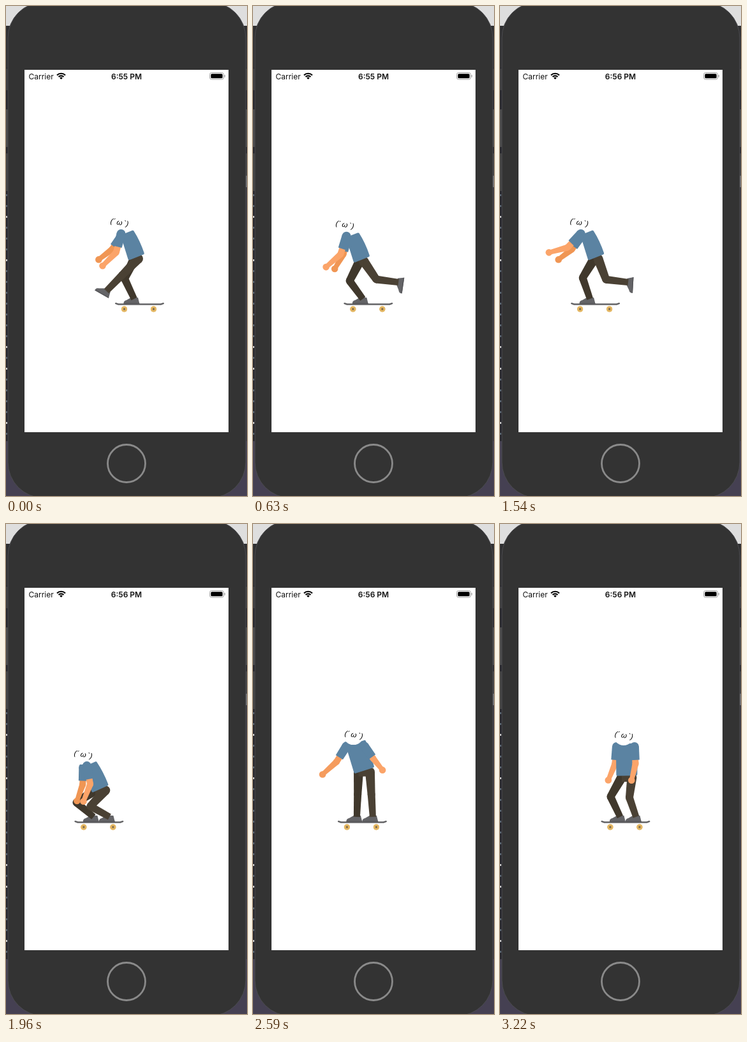
Recreate the animation shown at these times as an HTML page with a canvas. Size 378 by 768 pixels, loop 3.29 s.

```html
<!DOCTYPE html>
<html lang="en">
<head>
<meta charset="utf-8">
<title>Skater</title>
<style>
html, body { margin: 0; width: 100%; height: 100%; overflow: hidden; background: #24242a; }
canvas { display: block; }
</style>
</head>
<body>
<canvas id="stage" width="378" height="768"></canvas>
<script>
const ctx = document.getElementById('stage').getContext('2d');
const LOOP = 3290, STEP = 70, STRIDE = 930, TAU = Math.PI * 2, RAD = Math.PI / 180;
const SHIRT = '#5b83a2', PANTS = '#4a4134', PANTS_FAR = '#40382c', SHOE = '#646467';

const mix = (a, b, k) => a + (b - a) * k;
const add = (a, b) => [a[0] + b[0], a[1] + b[1]];
const blend = (a, b, k) => Object.fromEntries(Object.keys(a).map(key => [key, mix(a[key], b[key], k)]));

// Eased 0..1 while t goes from a to b
function ramp(t, a, b) {
  const u = Math.min(1, Math.max(0, (t - a) / (b - a)));
  return (1 - Math.cos(Math.PI * u)) / 2;
}

// x: hip from board, y: hip, gap: half distance of the legs, cx/cy: chest from hip,
// near/far: arm angles forward from straight down, with the arm lengths
const CROUCH = { x: 7, y: 425, gap: 10, cx: -17, cy: -39, near: 0, nearLen: 55, far: 3, farLen: 54, bend: 8 };
const AIR = { x: -2.5, y: 337, gap: 7.5, cx: -7, cy: -50, near: -90, nearLen: 36, far: 93, farLen: 64, bend: -13 };
const STAND = { x: 2, y: 397, gap: 8, cx: -1, cy: -51, near: 5, nearLen: 53, far: 14, farLen: 54, bend: 4 };

function pushPose(t) {
  const sway = Math.cos(TAU * t / 1540), step = Math.cos(TAU * t / STRIDE);
  return {
    x: -7 + 6 * sway - 4 * step, y: 398 - 2 * sway, gap: 3, cx: -14, cy: -39,
    near: 36 - 19 * step + 13 * sway, nearLen: 58,
    far: 32 + 12 * sway, farLen: 52, bend: 8
  };
}

function bodyPose(t) {
  let pose = blend(pushPose(t), CROUCH, ramp(t, 1780, 2060));
  pose = blend(pose, AIR, ramp(t, 2060, 2310));
  pose = blend(pose, CROUCH, ramp(t, 2340, 2790));
  return blend(pose, STAND, ramp(t, 2860, 3220));
}

// The scene drifts right while every push carries the board left
function boardX(t) {
  const pushes = ramp(t, 240, 820) + ramp(t, 240 + STRIDE, 820 + STRIDE);
  return 209.5 + 0.0405 * t - 71.5 * pushes;
}

const airborne = t => ramp(t, 2100, 2310) - ramp(t, 2320, 2560);

// Feet are [x from board, y, angle]
const mixFoot = (a, b, k) => a.map((v, i) => mix(v, b[i], k));

function pushFoot(t) {
  const p = t / STRIDE % 1;
  const x = -52 + 107 * (ramp(p, 0, 0.6) - ramp(p, 0.61, 1));
  const lift = 1 - ramp(p, -0.07, 0.1) + ramp(p, 0.42, 0.64) - 0.35 * ramp(p, 0.88, 1);
  const stride = [x, 471 - 38 * lift, -(25 + 1.2 * x) * Math.sqrt(Math.max(0, lift))];
  const settled = mixFoot(stride, [16.5, 459, 0], ramp(t, 1600, 1920));
  return mixFoot(settled, [34, 402, -80], airborne(t));
}

const rideFoot = t => mixFoot([-8.5, 459, 0], [-32, 383, -43], airborne(t));

function rect(x, y, w, h, color) {
  ctx.fillStyle = color;
  ctx.fillRect(x, y, w, h);
}

function disc(p, r, color) {
  ctx.fillStyle = color;
  ctx.beginPath();
  ctx.arc(p[0], p[1], r, 0, TAU);
  ctx.fill();
}

function ring(x, y, r, from, to) {
  ctx.beginPath();
  ctx.arc(x, y, r, from, to);
  ctx.stroke();
}

function rounded(x, y, w, h, r) {
  ctx.beginPath();
  ctx.roundRect(x, y, w, h, r);
}

function placed(x, y, angle, paint) {
  ctx.save();
  ctx.translate(x, y);
  ctx.rotate(angle * RAD);
  paint();
  ctx.restore();
}

// Tapered bone with radius ra at a and rb at b
function bone(a, b, ra, rb, color) {
  const dx = b[0] - a[0], dy = b[1] - a[1], d = Math.hypot(dx, dy) || 1;
  const nx = -dy / d, ny = dx / d;
  ctx.fillStyle = color;
  ctx.beginPath();
  ctx.moveTo(a[0] + nx * ra, a[1] + ny * ra);
  ctx.lineTo(b[0] + nx * rb, b[1] + ny * rb);
  ctx.lineTo(b[0] - nx * rb, b[1] - ny * rb);
  ctx.lineTo(a[0] - nx * ra, a[1] - ny * ra);
  ctx.fill();
}

// Middle joint pushed sideways from the line a-b
function joint(a, b, bend) {
  const dx = b[0] - a[0], dy = b[1] - a[1], d = Math.hypot(dx, dy) || 1;
  return [(a[0] + b[0]) / 2 + dy / d * bend, (a[1] + b[1]) / 2 - dx / d * bend];
}

function backdrop() {
  rect(0, 0, 378, 768, '#25252b');
  rect(0, 0, 378, 31, '#dedede');
  rect(0, 31, 378, 66, '#303032');
  rect(0, 98, 378, 34, '#3c3c3e');
  rect(0, 162, 378, 59, '#4a4a4b');
  rect(0, 231, 378, 59, '#414142');
  rect(374, 266, 4, 18, '#77777a');
  rect(374, 284, 4, 400, '#39363f');
  rect(0, 682, 378, 86, '#454052');
  let seed = 7;
  for (let y = 295; y < 675; y += 17) {
    seed = seed * 16807 % 2147483647;
    rect(0, y, 2, 3, seed % 3 ? '#596571' : '#c8c8c8');
  }
}

function wifi(x, y) {
  const from = -Math.PI * 0.75, to = -Math.PI * 0.25;
  ctx.strokeStyle = ctx.fillStyle = '#000';
  ctx.lineWidth = 2.1;
  ring(x, y, 5.6, from, to);
  ring(x, y, 9.2, from, to);
  ctx.beginPath();
  ctx.moveTo(x, y);
  ctx.arc(x, y, 3.3, from, to);
  ctx.fill();
}

function phone(t) {
  rounded(3, -6, 373, 777, 56);
  ctx.fillStyle = '#333333';
  ctx.fill();
  ctx.strokeStyle = '#4c4c50';
  ctx.lineWidth = 1;
  ctx.stroke();
  rect(29, 100, 320, 568, '#fff');

  ctx.strokeStyle = '#8a8a8a';
  ctx.lineWidth = 2.8;
  ring(189, 717, 29.5, 0, TAU);

  ctx.fillStyle = '#111';
  ctx.textAlign = 'left';
  ctx.font = '400 12px Inter, sans-serif';
  ctx.fillText('Carrier', 35.5, 114.6);
  ctx.textAlign = 'center';
  ctx.font = '600 12px Inter, sans-serif';
  ctx.fillText(t < 770 ? '6:55 PM' : '6:56 PM', 189, 114.6);
  wifi(86.5, 115);

  ctx.strokeStyle = '#a2a2a2';
  ctx.lineWidth = 1;
  rounded(319.5, 104.5, 22, 10.5, 3);
  ctx.stroke();
  rounded(321.3, 106.2, 18.4, 7.1, 1.6);
  ctx.fillStyle = '#000';
  ctx.fill();
  rect(342.6, 108, 1.2, 3.6, '#a2a2a2');
}

function board(x, t) {
  const air = airborne(t), roll = TAU * ramp(t, 2150, 2580);
  const c = Math.cos(roll), s = Math.sin(roll), flat = Math.abs(s);
  const width = 2.4 + 10.5 * flat, half = 38.5 - width / 2;
  const wheels = () => {
    for (const wx of [-24, 22]) {
      for (const side of [-1, 1]) {
        ctx.fillStyle = '#e4b763';
        ctx.beginPath();
        ctx.ellipse(wx, 7.5 * c + side * 4.6 * s, 4.6, 4.6 - 1.2 * flat, 0, 0, TAU);
        ctx.fill();
      }
      if (flat < 0.7) disc([wx, 7.5 * c], 1.7, '#806b4c');
    }
  };
  placed(x, 467.5 - 44 * air, 27 * air, () => {
    if (s < 0) wheels();
    ctx.strokeStyle = '#636365';
    ctx.lineWidth = width;
    ctx.lineCap = ctx.lineJoin = 'round';
    ctx.beginPath();
    ctx.moveTo(-half, -1.3 * c);
    ctx.lineTo(-half + 4, 0);
    ctx.lineTo(half - 4, 0);
    ctx.lineTo(half, -1.3 * c);
    ctx.stroke();
    if (s >= 0) wheels();
  });
}

function shoe([x, y, angle]) {
  placed(x, y, angle, () => {
    ctx.fillStyle = SHOE;
    ctx.beginPath();
    ctx.moveTo(-5, -2);
    ctx.lineTo(6, -2);
    ctx.lineTo(8.5, 8);
    ctx.lineTo(-16.5, 8);
    ctx.quadraticCurveTo(-17, 3, -12, 2);
    ctx.fill();
    rect(-16.3, 6.6, 24.6, 1.4, '#565659');
  });
}

function leg(top, foot, size, color) {
  const d = Math.hypot(foot[0] - top[0], foot[1] - top[1]);
  const knee = joint(top, foot, -Math.sqrt(Math.max(0, size * size - d * d / 4)));
  shoe(foot);
  disc(top, 7.5, color);
  bone(top, knee, 7.5, 6, color);
  disc(knee, 6, color);
  bone(knee, foot, 6, 5, color);
}

function arm(shoulder, angle, length, bend, skin) {
  const hand = add(shoulder, [-length * Math.sin(angle * RAD), length * Math.cos(angle * RAD)]);
  const elbow = joint(shoulder, hand, bend);
  const reach = Math.hypot(elbow[0] - shoulder[0], elbow[1] - shoulder[1]) || 1;
  const hem = shoulder.map((v, i) => mix(v, elbow[i], Math.min(1, 21 / reach)));
  bone(shoulder, elbow, 5, 5, skin);
  disc(elbow, 5, skin);
  bone(elbow, hand, 5, 3.5, skin);
  disc(hand, 5.3, skin);
  disc(shoulder, 7, SHIRT);
  bone(shoulder, hem, 7, 6.6, SHIRT);
}

function torso(top, base, topHalf, baseHalf) {
  const dx = base[0] - top[0], dy = base[1] - top[1], d = Math.hypot(dx, dy);
  const at = (u, w) => [top[0] + dx * u + dy / d * w, top[1] + dy * u - dx / d * w];
  ctx.fillStyle = ctx.strokeStyle = SHIRT;
  ctx.lineWidth = 4;
  ctx.lineJoin = 'round';
  ctx.beginPath();
  ctx.moveTo(...at(0, -topHalf + 2));
  ctx.lineTo(...at(0, topHalf - 2));
  ctx.quadraticCurveTo(...at(0.45, Math.max(topHalf, baseHalf) - 1), ...at(0.97, baseHalf - 2));
  ctx.lineTo(...at(0.97, -baseHalf + 2));
  ctx.closePath();
  ctx.fill();
  ctx.stroke();
}

function face(p, angle) {
  disc(p, 16, '#fff');
  placed(p[0] + 0.5, p[1] + 0.5, angle, () => {
    ctx.fillStyle = '#000';
    ctx.textAlign = 'center';
    ctx.font = 'italic 11.5px "Liberation Sans", Arial, sans-serif';
    ctx.fillText('(´\u2009ω\u2009`)', 0, 3.5);
  });
}

function skinTone(light) {
  const [r, g, b] = [[240, 251], [150, 164], [84, 105]].map(([a, z]) => Math.round(mix(a, z, light)));
  return `rgb(${r},${g},${b})`;
}

function skater(t) {
  const pose = bodyPose(t), bx = boardX(t);
  const turn = ramp(t, 1800, 2310); // profile to front view
  const hip = [bx + pose.x, pose.y];
  const chest = add(hip, [pose.cx, pose.cy]);
  const onBoard = ([x, y, angle]) => [bx + x, y, angle];
  const left = add(hip, [-pose.gap, 0]), right = add(hip, [pose.gap, 0]);

  board(bx, t);
  leg(left, onBoard(rideFoot(t)), 35, PANTS_FAR);
  leg(right, onBoard(pushFoot(t)), 35 - 3 * turn, PANTS);
  bone(left, right, 7, 7, PANTS);
  arm(add(chest, [mix(-9, -15, turn), 3]), pose.far, pose.farLen, 4, skinTone(ramp(t, 2400, 2800)));
  torso(chest, add(hip, [0, -3]), mix(11, 16, turn), mix(13.5, 16.5, turn));
  face(add(chest, [mix(-13, -4, turn), mix(-18, -15, turn)]), 10);
  arm(add(chest, [mix(-10, 13, turn), 3 * turn]), pose.near, pose.nearLen, pose.bend, skinTone(1));
}

const start = performance.now();

function draw(now) {
  const time = Math.max(0, now - start) % LOOP;
  const t = Math.floor(time / STEP) * STEP;
  backdrop();
  phone(t);
  skater(t);
  requestAnimationFrame(draw);
}

draw(start);
</script>
</body>
</html>
```
